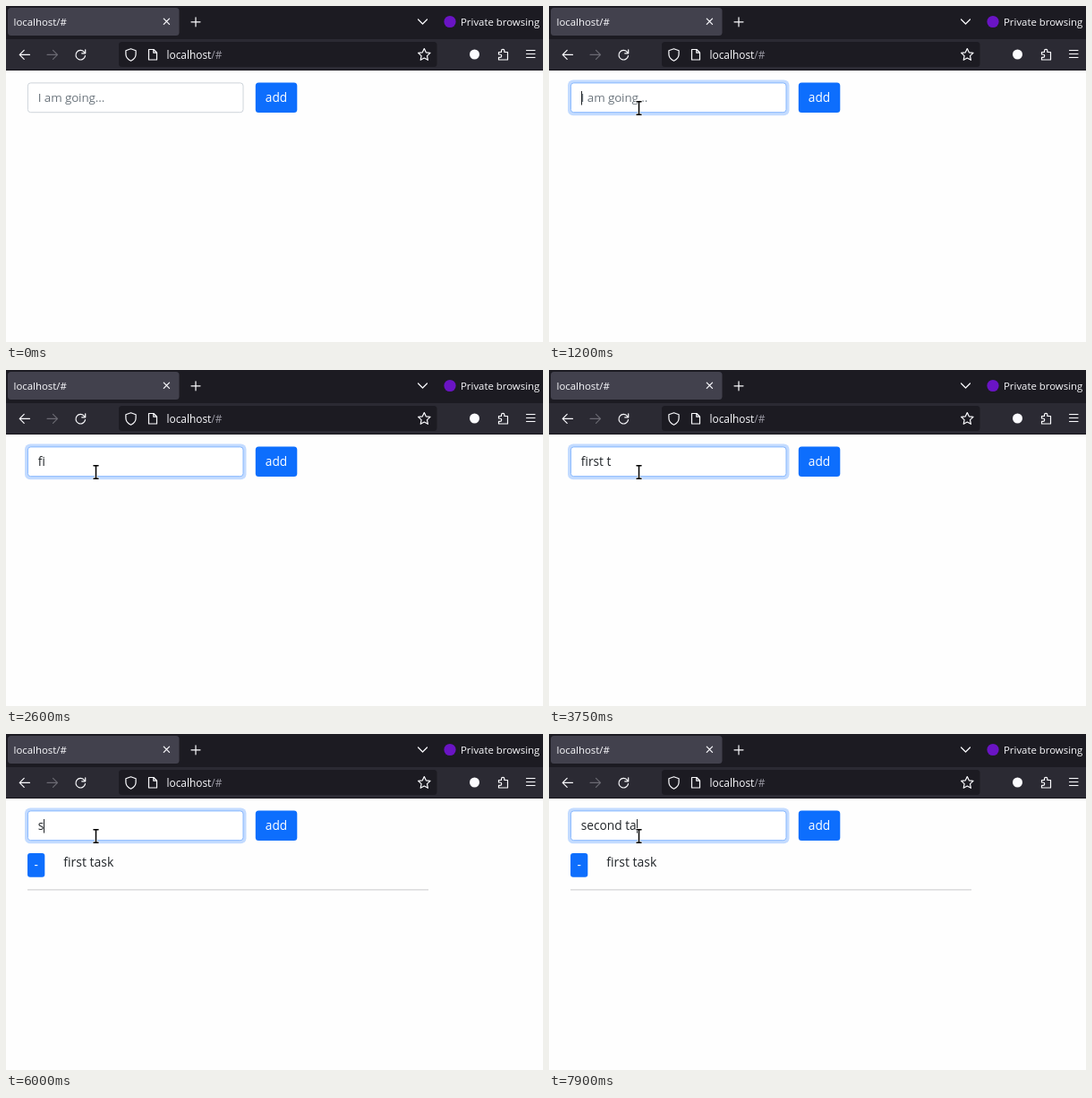
Write an HTML page that moves like this. It is 600x375 px and loops after 8000 ms.

```html
<!DOCTYPE html>
<html lang="en">
<head>
<meta charset="utf-8">
<title>Task list</title>
<style>
html, body { margin: 0; width: 100%; height: 100%; overflow: hidden; background: #fefefe; }
svg { display: block; width: 600px; height: 375px; }
text { font: 13.7px "Open Sans", "Noto Sans", sans-serif; fill: #212529; white-space: pre; }
.bar text { font-size: 11.4px; fill: #fbfbfe; }
.icons { fill: none; stroke: #fbfbfe; stroke-width: 1.2; stroke-linecap: round; stroke-linejoin: round; }
.blue { fill: #0d6efd; }
svg .light { fill: #fff; }
#hint { font-size: 13.4px; fill: #6c757d; letter-spacing: -.1px; }
</style>
</head>
<body>
<svg viewBox="0 0 600 375">
  <rect width="600" height="375" fill="#fefefe"/>

  <g class="bar">
    <rect width="600" height="37" fill="#1c1b22"/>
    <rect y="37" width="600" height="35" fill="#2b2a33"/>
    <rect y="71" width="600" height="1" fill="#15141a"/>
    <rect x="2" y="2" width="191.5" height="31" rx="3.5" fill="#42414d"/>
    <rect x="126" y="40" width="355.5" height="28" rx="3.5" fill="#1c1b22"/>
    <text x="8.5" y="21.5">localhost/#</text>
    <text x="179.5" y="58.5" style="font-size:11.9px">localhost<tspan fill="#9a99a3">/#</tspan></text>
    <text x="508" y="21.5">Private browsing</text>
    <circle cx="496" cy="17.5" r="6.6" fill="#6a14c4"/>
    <circle cx="523.5" cy="54" r="5.5" fill="#fbfbfe"/>
  </g>

  <g class="icons">
    <path d="M176.3 14.2l6.2 6.2m0-6.2l-6.2 6.2M207 17.8h10M212 12.8v10M460.5 15l5 5 5-5"/>
    <path d="M26.5 54.3H15.2M20.2 49.3l-5 5 5 5"/>
    <path d="M46 54.3h11.5M52.5 49.3l5 5-5 5" stroke="#6b6a73"/>
    <path d="M87.6 51.6a5.3 5.3 0 1 0 .9 4M88.7 48.8v4h-4"/>
    <path d="M139.5 47.8l5.6 2v4c0 3.6-2.5 6-5.6 7.4c-3.1-1.4-5.6-3.8-5.6-7.4v-4z"/>
    <path d="M159.5 48.5h5.5l3.5 3.5v8h-9zM164.8 48.5v3.7h3.7"/>
    <path d="M467.3 47.5l2 4.3 4.7.6-3.5 3.2.9 4.7-4.1-2.3-4.1 2.3.9-4.7-3.5-3.2 4.7-.6z"/>
    <path d="M550.5 51.5h3v-1.5a1.7 1.7 0 0 1 3.4 0v1.5h3.6v8.5h-10v-2.6h1.5a1.7 1.7 0 0 0 0-3.4h-1.5z"/>
    <path d="M581.5 49.5h9.5m-9.5 4h9.5m-9.5 4h9.5"/>
  </g>

  <rect id="halo" x="21" y="82.5" width="247.5" height="39.8" rx="6" fill="#c3dbff"/>
  <rect id="field" x="24.4" y="85.9" width="240.6" height="32.8" rx="3.2" fill="#fff" stroke="#ced4da"/>
  <text id="hint" x="35.8" y="107">I am going...</text>
  <text id="typed" x="35.8" y="107"></text>
  <rect id="caret" y="95" width="1" height="15.5" fill="#212529"/>
  <rect class="blue" x="278.8" y="85.6" width="46.5" height="33.5" rx="3.5"/>
  <text class="light" x="302" y="107" text-anchor="middle">add</text>

  <g id="item">
    <rect class="blue" x="24" y="133" width="19.3" height="26.7" rx="3"/>
    <text class="light" x="33.7" y="150.5" text-anchor="middle">-</text>
    <text x="64.3" y="148" style="font-size:14px">first task</text>
    <rect x="24" y="173.4" width="448" height="1" fill="#c8c9ca"/>
  </g>

  <g id="pointer">
    <g id="beam" fill="none" stroke-linecap="round">
      <path d="M-2.5-7.3H2.5M0-7V7M-2.5 7.3H2.5" stroke="#fff" stroke-width="3"/>
      <path d="M-2.5-7.3H2.5M0-7V7M-2.5 7.3H2.5" stroke="#000" stroke-width="1.5"/>
    </g>
    <path id="arrow" d="M0 0v14l3.3-3 2.3 5 2.3-1-2.3-5h4.5z" fill="#000" stroke="#fff"/>
  </g>
</svg>
<script>
const LOOP = 8000, FOCUS = 870, SUBMIT = 4700, BLINK = 600, LAG = 50;
const entries = [
  { text: "first task", keys: [2400, 2600, 2750, 3050, 3250, 3500, 3750, 3950, 4200, 4450] },
  { text: "second ta", keys: [5800, 6100, 6350, 6500, 6700, 6950, 7250, 7550, 7850] }
];
// time, x, y
const path = [[50, 232, 77], [700, 82.5, 99], [850, 100.5, 114]];

const $ = id => document.getElementById(id);
const show = (id, on) => $(id).setAttribute("visibility", on ? "visible" : "hidden");
const clamp = v => Math.max(0, Math.min(1, v));

function pointerAt(t) {
  const i = t < path[1][0] ? 0 : 1, [a, b] = [path[i], path[i + 1]];
  const k = clamp((t - a[0]) / (b[0] - a[0])), e = k * k * (3 - 2 * k);
  return [a[1] + (b[1] - a[1]) * e, a[2] + (b[2] - a[2]) * e];
}

function caretOn(t, lastKey) {
  if (t < FOCUS) return false;
  if (lastKey !== undefined) {
    const age = t - lastKey;
    return age >= LAG && age % (2 * BLINK) < BLINK;
  }
  if (t >= SUBMIT) return t >= 5250;
  return (t - FOCUS) % (2 * BLINK) < BLINK;
}

function draw(t) {
  const entry = entries[t < SUBMIT ? 0 : 1];
  const count = entry.keys.filter(k => k <= t).length;
  const typed = $("typed");
  typed.textContent = entry.text.slice(0, count);
  show("hint", !count);
  show("item", t >= SUBMIT + 50);

  const width = count ? typed.getComputedTextLength() : 0;
  $("caret").setAttribute("x", Math.round(35.8 + width));
  show("caret", caretOn(t, entry.keys[count - 1]));

  const focus = clamp((t - FOCUS) / 150);
  $("halo").setAttribute("opacity", focus);
  $("field").setAttribute("stroke", `rgb(${206 - 72 * focus},${212 - 29 * focus},${218 + 36 * focus})`);

  const [x, y] = pointerAt(t), inside = x < 266 && y > 85;
  $("pointer").setAttribute("transform", `translate(${x} ${y})`);
  show("beam", t >= 50 && inside);
  show("arrow", t >= 50 && !inside);
}

function tick() {
  draw(performance.now() % LOOP);
  requestAnimationFrame(tick);
}
tick();
</script>
</body>
</html>
```
